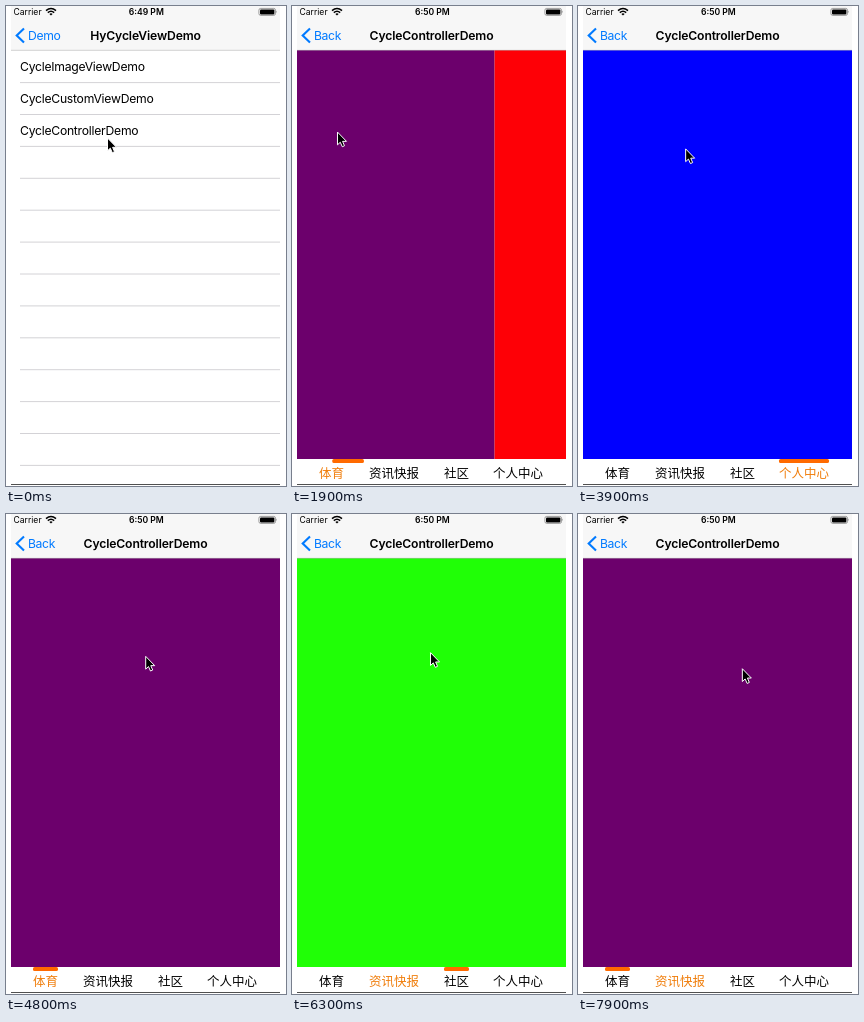
These frames come from a looping animation (280 by 480 pixels, 8000 ms). An HTML page:

```html
<!DOCTYPE html>
<html lang="en">
<head>
<meta charset="utf-8">
<style>
html, body { margin: 0; width: 100%; height: 100%; overflow: hidden; background: #fff; }
svg { display: block; width: 280px; height: 480px; }
text { font: 12.2px Inter, sans-serif; letter-spacing: -.26px; }
.title { font-weight: 600; letter-spacing: -.14px; text-anchor: middle; }
.status { font-size: 8.6px; letter-spacing: 0; }
.tab { font: 12.5px "Noto Sans CJK SC", "Noto Sans CJK", sans-serif; letter-spacing: 0; }
.link { fill: #007aff; letter-spacing: -.36px; }
</style>
</head>
<body>
<svg viewBox="0 0 280 480">
  <clipPath id="screen"><rect x="5" width="269" height="480"/></clipPath>
  <g clip-path="url(#screen)">
    <g id="list">
      <rect id="pressed" x="5" y="108.5" width="269" height="32" fill="#d9d9d9"/>
      <g id="rules" stroke="#c8c7cc" stroke-width=".8"></g>
    </g>
    <rect id="dim" x="5" y="44" width="269" height="436"/>
    <g id="detail">
      <rect x="5" y="44" width="269" height="436" fill="#fff"/>
      <g id="pages"></g>
      <rect x="5" y="453" width="269" height="27" fill="#fff"/>
      <g id="tabs"></g>
    </g>
    <rect x="5" width="269" height="44" fill="#f7f7f7"/>
    <path d="M5 44.3H274" stroke="#b2b2b2" stroke-width=".6"/>
    <path d="M5 478.5H274" stroke="#505050"/>
    <path d="M18 22.5L10.7 29.5L18 36.5" fill="none" stroke="#007aff" stroke-width="2.1"/>
    <text id="oldBack" class="link" x="22" y="33.5">Demo</text>
    <text id="newBack" class="link" x="22" y="33.5">Back</text>
    <text id="oldTitle" class="title" x="139.5" y="33.5">HyCycleViewDemo</text>
    <text id="newTitle" class="title" x="139.5" y="33.5">CycleControllerDemo</text>
    <text class="status" x="7.5" y="9">Carrier</text>
    <g fill="none" stroke="#000" stroke-width="1.5">
      <path d="M40 4.6Q45 .4 50 4.6M41.8 6.6Q45 3.8 48.2 6.6"/>
      <path d="M45 9.5L43.4 7.9Q45 6.6 46.6 7.9Z" fill="#000" stroke="none"/>
    </g>
    <text id="clock" class="status title" x="140.3" y="9"></text>
    <rect x="252.9" y="2.4" width="16.6" height="7" rx="1.8" fill="none" stroke="#777" stroke-width=".7"/>
    <rect x="254" y="3.4" width="14.4" height="5" rx="1"/>
    <path d="M270.3 4.6Q271.6 5.9 270.3 7.2Z" fill="#777"/>
  </g>
  <path id="cursor" d="M0 0V12.8L2.8 10.2L4.8 14.7L7 13.7L5.1 9.3H9Z" stroke="#fff" stroke-linejoin="round"/>
</svg>
<script>
const LOOP = 8000, WIDTH = 269, PUSH = 600;
const COLORS = ['#6c006c', '#fe0006', '#20ff06', '#0000ff'];
const TABS = [['体育', 27, 25], ['资讯快报', 77, 50], ['社区', 152, 25], ['个人中心', 201, 50]];

// Swipes come at a steady pace; the tab highlight follows once a page has come to rest.
const FIRST = 1732, PERIOD = 805, GLIDE = 500, SETTLE = 550;
const direction = i => i < 6 ? 1 : -1;

// Where the pointer takes hold for each swipe
const GRABS = [[125, 134], [130, 136], [137, 146], [140, 146], [152, 143], [163.5, 141], [181, 143], [127, 151]];
const IDLE = [101.5, 132], TAP = [101.5, 122];

const $ = id => document.getElementById(id);
const mix = (a, b, k) => a + (b - a) * k;
const clamp = k => Math.max(0, Math.min(1, k));
const smooth = k => k * k * (3 - 2 * k);
const ease = (t, from, to) => smooth(clamp((t - from) / (to - from)));
const between = (p, q, k) => p.map((v, i) => mix(v, q[i], k));
const wrap = n => (n % 4 + 4) % 4;
const shift = (el, x, y = 0) => el.setAttribute('transform', `translate(${x} ${y})`);
const fade = (k, ...ids) => ids.forEach(id => $(id).setAttribute('opacity', clamp(k)));

function add(parent, tag, attrs, label = '') {
  const el = document.createElementNS('http://www.w3.org/2000/svg', tag);
  for (const key in attrs) el.setAttribute(key, attrs[key]);
  el.textContent = label;
  return parent.appendChild(el);
}

for (let i = 0; i < 13; i++) add($('rules'), 'path', { d: `M14 ${76.6 + i * 31.9}H274` });
['Image', 'CustomView', 'Controller'].forEach((kind, i) =>
  add($('list'), 'text', { x: 14, y: 65 + i * 32 }, `Cycle${kind === 'Image' ? 'ImageView' : kind}Demo`));
const pages = [0, 1].map(() => add($('pages'), 'rect', { x: 5, y: 44, width: WIDTH, height: 409 }));
const labels = TABS.map(([name, x]) => add($('tabs'), 'text', { class: 'tab', x, y: 472 }, name));
const marker = add($('tabs'), 'rect', { y: 453, height: 4, rx: 1.6, fill: '#ff6a00' });

function drawPager(t) {
  let page = 0, selected = 0;
  GRABS.forEach((_, i) => {
    const start = FIRST + i * PERIOD;
    page += direction(i) * ease(t, start, start + GLIDE);
    if (t >= start + SETTLE) selected += direction(i);
  });
  const base = Math.floor(page + 1e-6), part = Math.max(0, page - base);
  pages.forEach((el, i) => {
    el.setAttribute('fill', COLORS[wrap(base + i)]);
    shift(el, (i - part) * WIDTH);
  });
  const [, fromX, fromWidth] = TABS[wrap(base)], [, toX, toWidth] = TABS[wrap(base + 1)];
  marker.setAttribute('x', mix(fromX, toX, part));
  marker.setAttribute('width', mix(fromWidth, toWidth, part));
  labels.forEach((el, i) => el.setAttribute('fill', i === wrap(selected) ? '#f07d0a' : '#000'));
}

function drawPush(t) {
  const s = Math.max(0, t - PUSH) * .0165;
  const left = (1 + s) * Math.exp(-s), done = 1 - left;
  const offset = left * WIDTH;
  shift($('detail'), offset);
  shift($('tabs'), Math.min(2, offset));
  shift($('list'), -80 * done);
  shift($('oldTitle'), -100 * done);
  shift($('newTitle'), offset * .4);
  fade(.1 * done, 'dim');
  fade(t > 500 ? 1 : 0, 'pressed');
  fade(1 - done * 1.6, 'oldTitle', 'oldBack');
  fade(done * 1.6 - .6, 'newTitle', 'newBack');
}

// Quick drag along the swipe, then a slower return to the next hold.
function pointerAt(t) {
  if (t < FIRST) {
    return between(between(IDLE, TAP, ease(t, 0, PUSH)), GRABS[0], ease(t, 1100, FIRST));
  }
  const i = Math.floor((t - FIRST) / PERIOD), phase = (t - FIRST) / PERIOD - i;
  const hold = GRABS[i], next = GRABS[i + 1] || hold, step = direction(i);
  const release = [hold[0] - 80 * step, hold[1] - 8 * step];
  return between(between(hold, release, ease(phase, 0, .22)), next, ease(phase, .35, .95));
}

function draw(t) {
  drawPush(t);
  drawPager(t);
  shift($('cursor'), ...pointerAt(t));
  $('clock').textContent = t < 1300 ? '6:49 PM' : '6:50 PM';
}

const began = performance.now();
function tick() {
  draw((performance.now() - began) % LOOP);
  requestAnimationFrame(tick);
}
tick();
</script>
</body>
</html>
```
